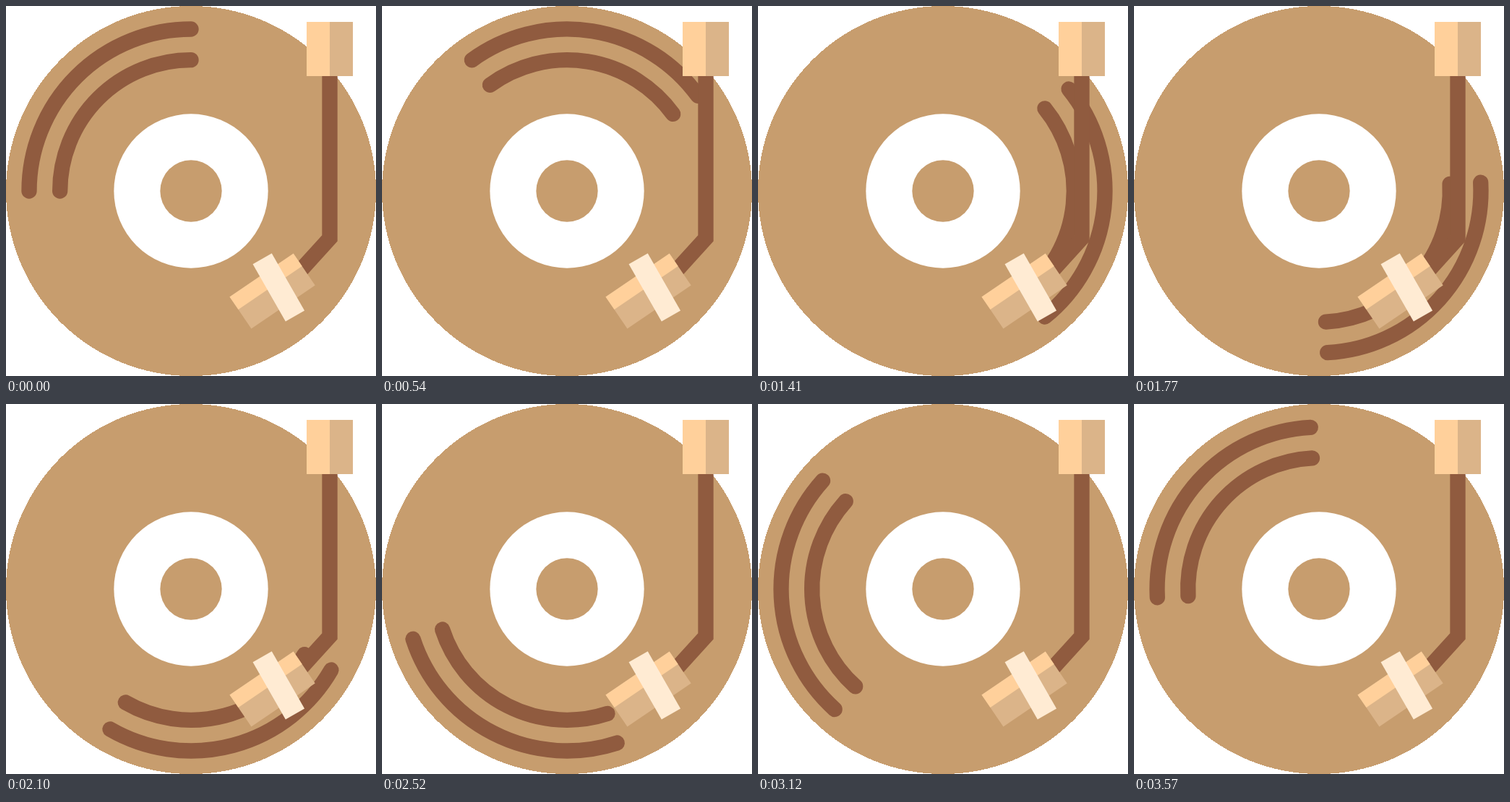
These frames come from a looping animation (512 by 512 pixels, 3600 ms). An HTML page with a canvas:

```html
<!DOCTYPE html>
<html lang="en">
<head>
<meta charset="utf-8">
<title>Turntable</title>
<style>
  html, body { margin: 0; width: 100%; height: 100%; overflow: hidden; background: #fff; }
  canvas { display: block; width: 512px; height: 512px; }
</style>
</head>
<body>
<canvas id="stage" width="512" height="512"></canvas>
<script>
const ctx = document.getElementById('stage').getContext('2d');
const SIZE = 512, CENTER = SIZE / 2, UNIT = SIZE / 24;
const LOOP = 3600, STEP = 30;
const COLORS = {
  vinyl: '#c79d6e', groove: '#905b3f', label: '#fff',
  light: '#ffd09b', shade: '#dbb489', strap: '#ffebd3'
};

// Row by row, which keeps the rim free of antialiasing.
function crispDisc(radius, color) {
  ctx.fillStyle = color;
  for (let y = 0; y < SIZE; y++) {
    const half = Math.round(Math.sqrt(radius ** 2 - (y + 0.5 - CENTER) ** 2));
    ctx.fillRect(CENTER - half, y, half * 2, 1);
  }
}

function disc(radius, color) {
  ctx.fillStyle = color;
  ctx.beginPath();
  ctx.arc(CENTER, CENTER, radius, 0, Math.PI * 2);
  ctx.fill();
}

function groove(radius, turn) {
  ctx.beginPath();
  ctx.arc(CENTER, CENTER, radius, turn + Math.PI, turn + Math.PI * 1.5);
  ctx.stroke();
}

// Runs draw() with the origin at (x, y), rotated by the given degrees.
function placed(x, y, degrees, draw) {
  ctx.save();
  ctx.translate(x, y);
  ctx.rotate(degrees * Math.PI / 180);
  draw();
  ctx.restore();
}

function block(color, x, y, width, height) {
  ctx.fillStyle = color;
  ctx.fillRect(x, y, width, height);
}

function drawRecord(turn) {
  crispDisc(CENTER, COLORS.vinyl);
  ctx.lineCap = 'round';
  groove(UNIT * 10.5, turn);
  groove(UNIT * 8.5, turn);
  disc(UNIT * 5, COLORS.label);
  disc(UNIT * 2, COLORS.vinyl);
}

function drawArm() {
  ctx.lineCap = 'butt';
  ctx.beginPath();
  ctx.moveTo(448, 90);
  ctx.lineTo(448, 321.3);
  ctx.lineTo(402, 372);
  ctx.stroke();

  block(COLORS.light, 416, 22, 32, 75);
  block(COLORS.shade, 448, 22, 32, 75);

  placed(368.6, 394.5, -34.2, () => {
    const width = UNIT * 5, height = UNIT * 2.5;
    block(COLORS.shade, -width / 2, -height / 2, width, height);
    block(COLORS.light, -width / 2, -height / 2, width, UNIT);
  });
  placed(377.3, 389.4, -29.8, () => block(COLORS.strap, -15.1, -45.6, 30.2, 91.2));
}

function render(elapsed) {
  const time = Math.floor((elapsed % LOOP) / STEP) * STEP;
  ctx.clearRect(0, 0, SIZE, SIZE);
  ctx.strokeStyle = COLORS.groove;
  ctx.lineWidth = UNIT;
  drawRecord(time / LOOP * Math.PI * 2);
  drawArm();
}

let start;
function tick(now) {
  start ??= now;
  render(now - start);
  requestAnimationFrame(tick);
}
render(0);
requestAnimationFrame(tick);
</script>
</body>
</html>
```
